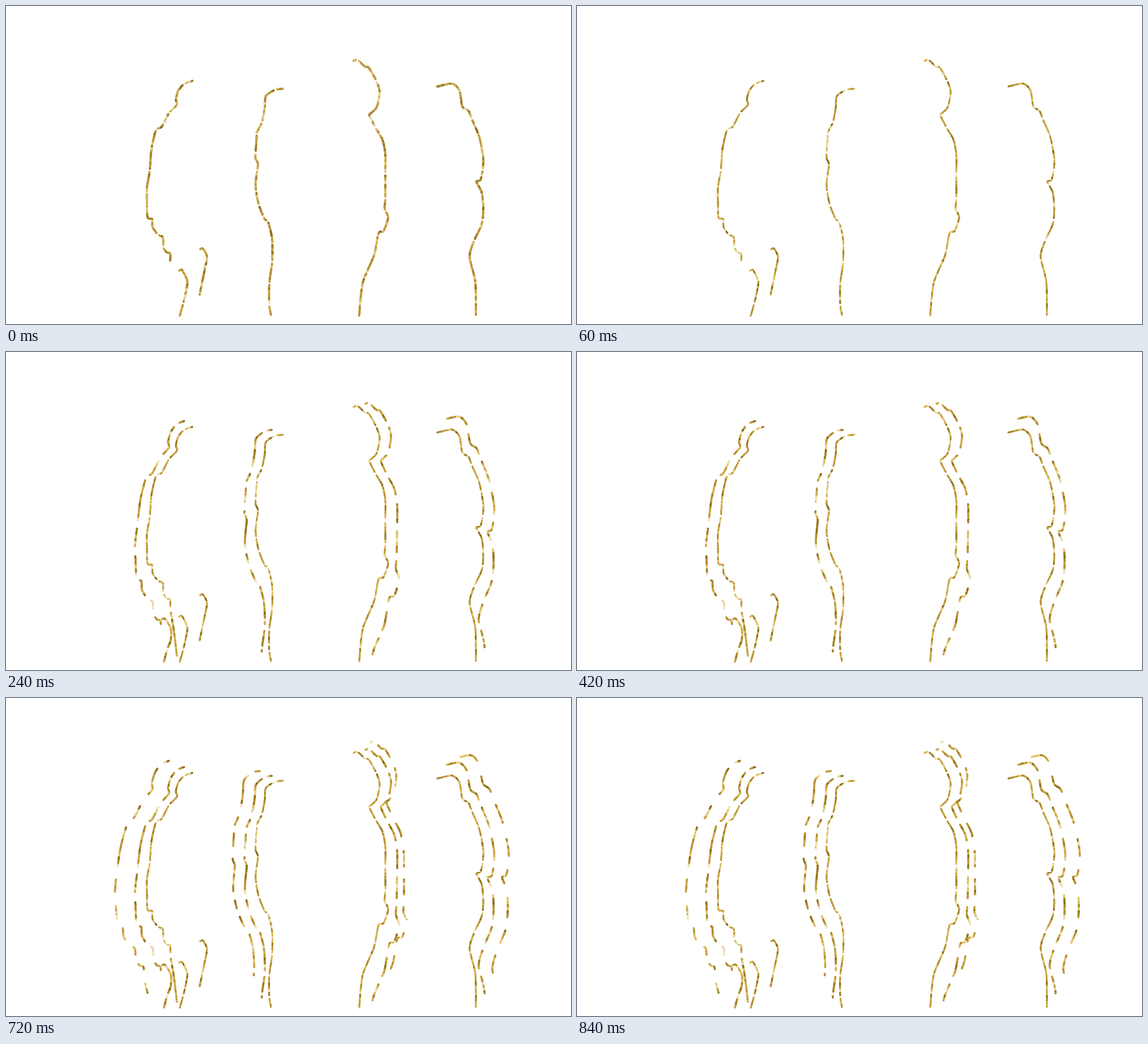
Animation of 998 by 561 pixels, one loop 0.9 s. Source, as an HTML page with a canvas:

```html
<!DOCTYPE html>
<html lang="en">
<head>
<meta charset="utf-8">
<title>Gold contours</title>
<style>
html, body { margin: 0; width: 100%; height: 100%; overflow: hidden; background: #fff; }
canvas { display: block; }
</style>
</head>
<body>
<canvas id="stage" width="998" height="561"></canvas>
<script>
const ctx = document.getElementById('stage').getContext('2d');
const LOOP = 900;
const CHANGES = [60, 240, 540, 840];

// Key points of each silhouette; "|" leaves a gap around the point before it.
// Each echo gives the shift [dx, dy] near the top, the middle and the bottom.
const figures = [
  { keys: `329,132 314,138|304,150 300,165 302,174 288,189|275,213 265,219|257,252 254,290|249,320
           249,345 250,373 258,376 259,390 268,403|277,408 278,425|283,434 290,437 290,449`,
    echoes: [[[-12, -11], [-22, 14], [-17, 38]], [[-39, -22], [-59, 19], [-47, 38]]] },
  { keys: `489,146 475,148|459,159 457,180 452,205|444,221 443,227|441,258|441,269 445,280 441,311
           442,328|447,352|457,376 463,381|470,411 470,452|465,490|465,527|468,545`,
    echoes: [[[-17, -10], [-20, 20], [-13, 34]], [[-38, -19], [-41, 21], [-32, 33]]] },
  { keys: `614,97 621,95|634,107 641,109 654,132|660,152 655,178 646,188 642,193 653,215|665,236
           670,262 670,297|670,339|669,358 675,373 667,397 658,401 650,440 630,489 624,546`,
    echoes: [[[20, -5], [21, 10], [18, 42]], [[29, -18], [33, 12], [33, 29]]] },
  { keys: `762,142 788,137 801,149 806,177 817,185 823,200|836,231 843,268 842,289|838,307 831,310
           840,328 843,352 842,377|838,391 827,414|819,442 829,487 830,545`,
    echoes: [[[12, -23], [20, 4], [16, 30]], [[33, -36], [46, 2], [40, 36]]] }
];
const limbs = [
  ['306,467 311,466 320,484 319,498 313,525|307,546', '343,429 348,428 355,443 350,470 342,509'],
  ['276,471 281,471 291,488 291,508 285,524|279,546', '291,460 296,488 302,536'],
  ['246,504 250,520']
];
const echoEnd = [Infinity, 498, 460];

const golds = ['#8f6c10', '#a98220', '#b8902c', '#c49c38', '#c7a03a', '#d6b048', '#e6c565', '#f1e2b4'];
const grains = ['#6f5514', '#a07b1c', '#ecd27a', '#fff8e0', '#96896a'];

let seed;
function random() {
  seed = (seed * 16807) % 2147483647;
  return seed / 2147483647;
}
const pick = list => list[Math.floor(random() * list.length)];
const mix = (a, b, t) => a + (b - a) * t;

// Smooth curve through the key points, sampled about every pixel, split at the gaps.
function trace(keys) {
  const tokens = keys.replace(/\|/g, '| ').trim().split(/\s+/);
  const points = tokens.map(token => token.split(',').map(parseFloat));
  const at = i => points[Math.max(0, Math.min(points.length - 1, i))];
  const strokes = [[points[0]]];
  for (let i = 1; i < points.length; i++) {
    const [a, b, c, d] = [at(i - 2), at(i - 1), at(i), at(i + 1)];
    const steps = Math.ceil(Math.hypot(c[0] - b[0], c[1] - b[1]));
    for (let k = 1; k <= steps; k++) {
      const t = k / steps, ease = t * t * (3 - 2 * t);
      strokes.at(-1).push([0, 1].map(j => mix(b[j], c[j], ease)
        + 0.38 * t * (1 - t) * ((1 - t) * (c[j] - a[j]) - t * (d[j] - b[j]))));
    }
    if (tokens[i].endsWith('|')) strokes.push([c]);
  }
  return strokes;
}

function shifted([x, y], shifts) {
  const u = Math.max(0, Math.min(2, (y - 140) / 150));
  const i = Math.min(1, Math.floor(u));
  const [dx, dy] = [0, 1].map(j => mix(shifts[i][j], shifts[i + 1][j], u - i));
  return [x + dx, y + dy];
}

// Outer echoes are broken into shorter dashes with wider gaps.
function dashes(strokes, layer) {
  return strokes.flatMap((path, index) => {
    const count = layer ? Math.max(1, Math.round(path.length / 50)) : 1;
    const size = path.length / count;
    const trim = Math.min(3.5 * (layer + 1), size / 4);
    return Array.from({ length: count }, (_, k) => path.slice(
      k * size + (layer || index ? trim : 0),
      (k + 1) * size - (layer || index < strokes.length - 1 ? trim : 0)));
  });
}

const layers = limbs.map((extra, layer) => {
  const bodies = figures.flatMap(({ keys, echoes }) => {
    const strokes = trace(keys).map(path => path.filter(([, y]) => y < echoEnd[layer]));
    const cut = dashes(strokes.filter(path => path.length > 4), layer);
    return layer ? cut.map(path => path.map(p => shifted(p, echoes[layer - 1]))) : cut;
  });
  return [...bodies, ...extra.flatMap(keys => dashes(trace(keys), 0))];
});

// Paints a path as short gold flakes with fine grains on top.
function glitter(path, width, density) {
  const flake = 5;
  for (let i = 0; i < path.length - 1; i += flake) {
    ctx.strokeStyle = pick(golds);
    ctx.beginPath();
    path.slice(i, i + flake + 1).forEach(([x, y]) => ctx.lineTo(x, y));
    ctx.stroke();
  }
  for (let n = path.length * density; n > 0; n--) {
    const [x, y] = pick(path);
    const angle = random() * 2 * Math.PI, r = random() * width / 2;
    ctx.fillStyle = pick(grains);
    ctx.fillRect(x + r * Math.cos(angle) - 0.5, y + r * Math.sin(angle) - 0.5, 1, 1);
  }
}

function draw(stage) {
  const coarse = stage === 0;
  ctx.fillStyle = '#fff';
  ctx.fillRect(0, 0, 998, 561);
  ctx.lineCap = ctx.lineJoin = 'round';
  layers.slice(0, Math.max(1, stage)).forEach((paths, layer) => {
    ctx.lineWidth = coarse ? 3.9 : layer ? 3.6 : 3.2;
    seed = 4211 + 977 * layer;
    paths.forEach(path => glitter(path, ctx.lineWidth, coarse ? 1.1 : 0.5));
  });
}

let shown = -1;
function tick() {
  const time = performance.now() % LOOP;
  const stage = CHANGES.filter(change => time >= change).length;
  if (stage !== shown) draw(shown = stage);
  requestAnimationFrame(tick);
}
tick();
</script>
</body>
</html>
```
